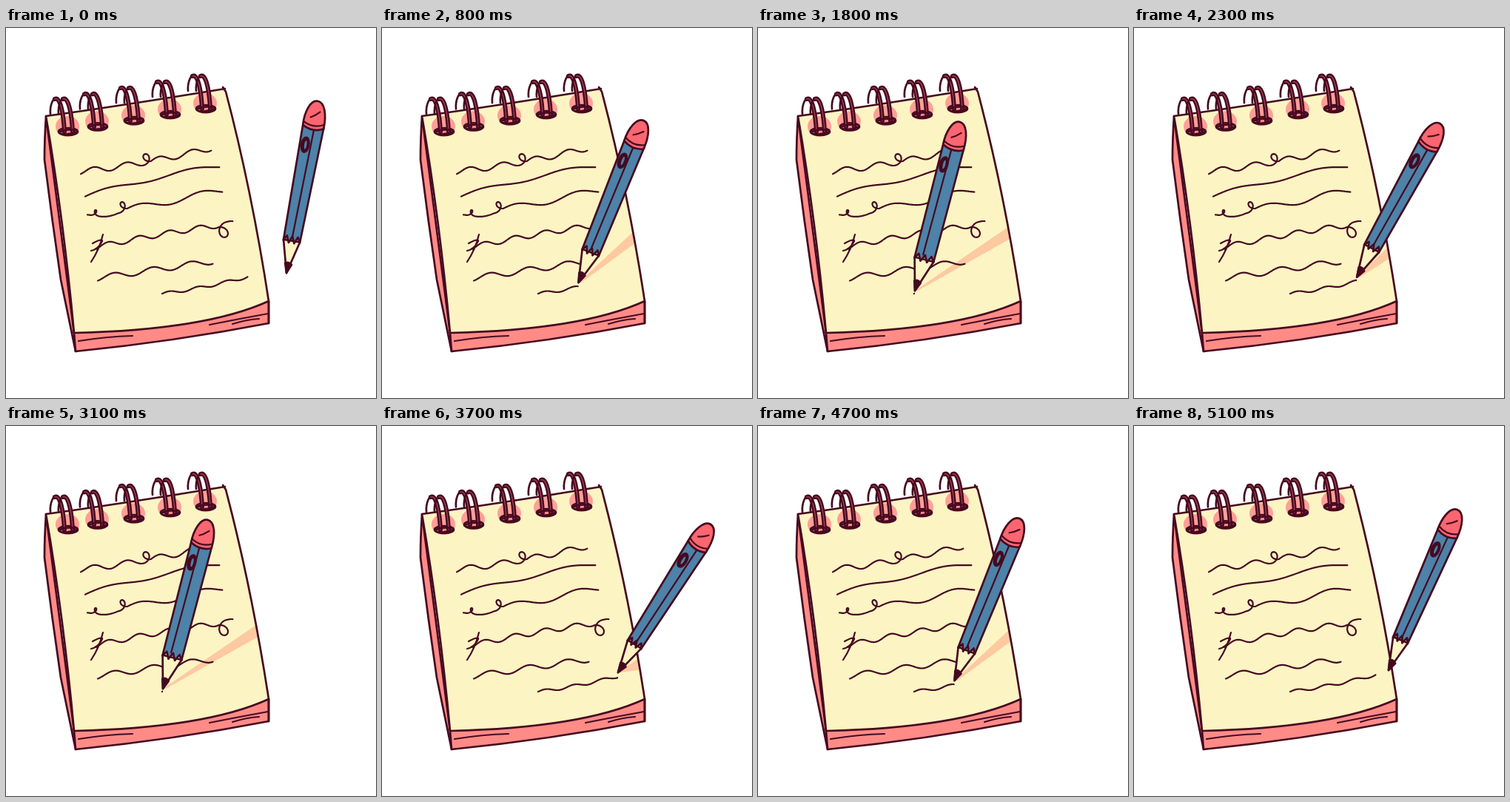
An HTML page that plays this animation: 500 by 500 pixels, repeating every 5.21 s.

```html
<!DOCTYPE html>
<html lang="en">
<head>
<meta charset="utf-8">
<title>Notepad and pencil</title>
<style>
  html, body { margin: 0; width: 100%; height: 100%; overflow: hidden; background: #fff; }
  svg { display: block; width: 100vw; height: 100vh; }
  .ink { fill: none; stroke: #450a20; stroke-width: 2.7; stroke-linecap: round; stroke-linejoin: round; }
  .thin { stroke-width: 2.2; }
  .tube { stroke-width: 6; }
  .gloss { stroke: #b8475a; stroke-width: 1.1; }
  .pink { fill: #ff8b87; }
  .blue { fill: #4d82a9; }
  .paper { fill: #fdf4c4; }
  .dark { fill: #450a20; }
  .red { fill: #fb6670; }
</style>
</head>
<body>
<svg viewBox="0 0 500 500">
  <defs>
    <clipPath id="page"><path d="M54 119L296 82Q332 219 355 369Q270 408 92 412Z"/></clipPath>
    <clipPath id="written"><rect id="reveal" x="200" y="320" width="0" height="60"/></clipPath>
  </defs>
  <path class="ink pink" d="M54 119Q52 150 52 178Q62 258 74 340L94 437Q225 424 355 399V369L92 412Z"/>
  <path class="paper" d="M54 119L296 82Q332 219 355 369Q270 408 92 412Q78 260 54 119Z"/>
  <g clip-path="url(#page)"><g id="halos"></g><path id="shadow" fill="#fdc9a1"/></g>
  <path class="ink" d="M54 119Q150 106 296 82M293 80L297 86Q332 219 355 369V399M54 119Q78 260 92 412L94 437M92 412Q270 408 355 369"/>
  <path class="ink thin" d="M98 423Q135 417 171 416M275 401Q315 393 354 386M306 400Q325 394 342 393"/>
  <g id="rings"></g>
  <g id="script"><path class="ink thin" d="M131 279Q126 300 115 316M117 291Q134 282 129 290Q124 299 115 301"/></g>
  <g id="pencil">
    <path id="cone" class="ink paper"/>
    <path class="ink dark" d="M0 0L-4 -13Q0 -16 5 -12Z"/>
    <path id="body" class="ink blue"/>
    <path id="ridge" class="ink thin"/>
    <ellipse class="ink dark" cx="-4" cy="-175" rx="5" ry="10"/>
    <ellipse class="blue" cx="-3.5" cy="-175" rx="1.6" ry="6"/>
    <path id="eraser" class="ink red"/>
    <path id="band" class="ink thin"/>
  </g>
</svg>
<script>
const $ = id => document.getElementById(id);
const set = (id, name, value) => $(id).setAttribute(name, value);
const mix = (a, b, f) => a + (b - a) * f;
const clamp = f => Math.max(0, Math.min(1, f));

function add(parent, tag, attrs) {
  const el = document.createElementNS("http://www.w3.org/2000/svg", tag);
  for (const key in attrs) el.setAttribute(key, attrs[key]);
  $(parent).append(el);
}

// Handwriting: a sagging wave between two points, with loops at given fractions
function scrawl({ from, to, sag = 0, amp, waves, phase, loops = [] }) {
  const points = [];
  for (let t = 0; t <= 1; t += 0.004) {
    let x = mix(from[0], to[0], t);
    let y = mix(from[1], to[1], t) + 4 * sag * t * (1 - t) + amp * Math.sin(2 * Math.PI * waves * t + phase);
    for (const { at, r } of loops) {
      const turn = 2 * Math.PI * clamp((t - at) / 0.07 + 0.5);
      x += Math.abs(r) * Math.sin(turn);
      y -= r * (1 - Math.cos(turn));
    }
    points.push(x.toFixed(1) + " " + y.toFixed(1));
  }
  return "M" + points.join("L");
}

const lines = [
  { from: [101, 194], to: [278, 162], sag: 3, amp: 4, waves: 4, phase: 2.2, loops: [{ at: .5, r: 7 }] },
  { from: [107, 228], to: [289, 187], sag: -4, amp: 3, waves: 1.55, phase: 3.25 },
  { from: [110, 255], to: [293, 219], sag: 1, amp: 4.5, waves: 2.2, phase: -.64, loops: [{ at: .06, r: 4 }, { at: .26, r: 6 }] },
  { from: [122, 296], to: [307, 264], sag: -2, amp: 3.5, waves: 4.5, phase: 2.23, loops: [{ at: .93, r: -9 }] },
  { from: [124, 338], to: [280, 315], amp: 4, waves: 3, phase: 2.07 }
];
for (const line of lines) add("script", "path", { class: "ink thin", d: scrawl(line) });
add("script", "path", {
  class: "ink thin", "clip-path": "url(#written)",
  d: scrawl({ from: [211, 359], to: [327, 336], sag: 2, amp: 2, waves: 3, phase: Math.PI })
});

// Spiral rings follow the slope of the top edge
for (const x of [84, 124, 173, 222, 270]) {
  const transform = `translate(${x} ${140 - (x - 84) / 6})`;
  const ring = (cls, d) => add("rings", "path", { transform, class: "ink " + cls, d });
  add("halos", "ellipse", { transform, cx: -1, cy: -7, rx: 16, ry: 14, fill: "#ff9f97" });
  add("rings", "ellipse", { transform, class: "ink pink", rx: 13, ry: 5 });
  for (const dx of [0, 11]) {
    const front = `M${dx - 18} -44C${dx - 10} -48 ${dx - 6} -20 ${dx - 5} 0`;
    ring("", `M${dx - 24} -24C${dx - 25} -36 ${dx - 20} -47 ${dx - 15} -45`);
    ring("tube", front);
    ring("gloss", front);
  }
  ring("", "M-12 1Q-4 -4 9 -2M-9 3Q2 5 12 0");
}

const LOOP = 5210, CYCLE = 1300, HOLD = 500, STEP = 100, STROKES = 6;
const rest = { x: 379, y: 331, tilt: 9.6, turn: .8 };
const lift = { x: 344, y: 330, tilt: 22.5, turn: 1 };
const writing = f => ({ x: mix(212, 319, f), y: mix(355, 333, f), tilt: mix(14.2, 31.3, f ** 1.3), turn: f });

// The shadow shrinks towards the right edge of the page
function shadowPath({ x, y }, f) {
  const top = mix(268, 313, f ** 3), edge = 297 + (top - 82) / 5 + 8;
  return `M${x} ${y}L${edge} ${top - 2}V${top + 16}L${x + 4} ${y}Z`;
}

function drawPencil({ x, y, tilt, turn }) {
  const left = -11.5, right = 17, foot = mix(15, 10, turn);
  const low = f => mix(left, foot, f), high = f => mix(left, right, f);
  const ridge = mix(.44, .58, turn), middle = high(.5);
  let teeth = "";
  for (let i = 5; i > 0; i--) teeth += `L${low(i / 6)} ${i % 2 ? -50 : -41}`;

  set("pencil", "transform", `translate(${x} ${y}) rotate(${tilt})`);
  set("cone", "d", `M0 0L${left} -44H${foot}Z`);
  set("body", "d", `M${left} -43V-202H${right}L${foot} -43${teeth}Z`);
  set("ridge", "d", `M${high(ridge)} -196L${low(ridge - .05)} -50`);
  set("eraser", "d", `M${left} -201C${left - 1} -218 ${high(.15)} -236 ${middle} -236S${right + 1} -220 ${right} -200Q${middle} -193 ${left} -201Z`);
  set("band", "d", `M${left} -206Q${middle} -198 ${right} -206M${high(.3)} -213Q${middle} -216 ${high(.7)} -222`);
}

function draw(ms) {
  const phase = Math.min(ms % LOOP, 4 * CYCLE - 1) % CYCLE;
  const step = Math.floor((phase - HOLD) / STEP);
  const active = step >= 0 && step <= STROKES;
  const f = step / STROKES;
  const pose = active ? writing(f) : step < 0 ? rest : lift;

  drawPencil(pose);
  set("reveal", "width", active ? pose.x - 200 : 140);
  set("shadow", "d", active ? shadowPath(pose, f) : "");
}

function tick() {
  draw(performance.now());
  requestAnimationFrame(tick);
}
tick();
</script>
</body>
</html>
```
